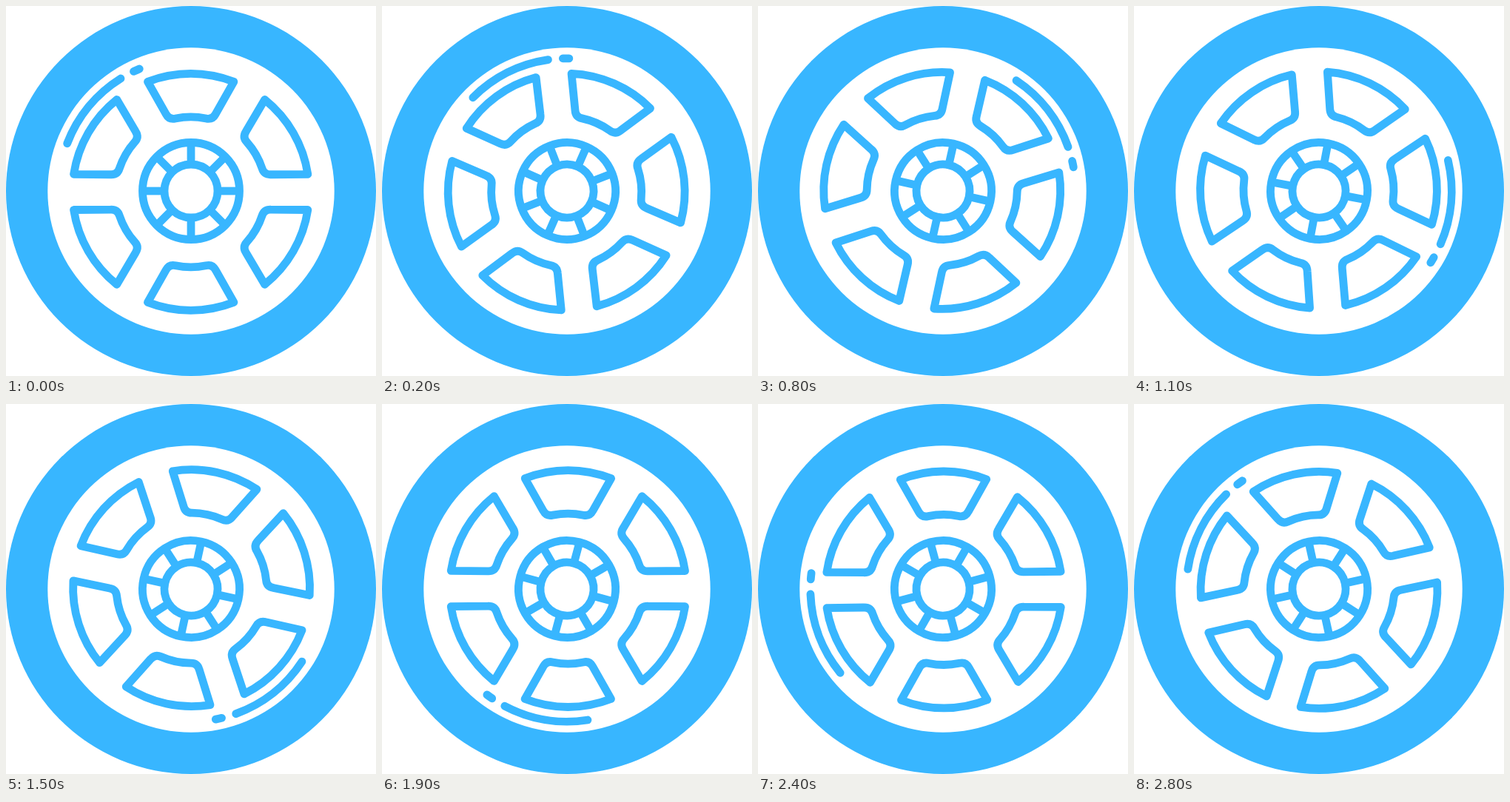
Recreate the animation shown at these times as an HTML page. Size 500 by 500 pixels, loop 2900 ms.

```html
<!DOCTYPE html>
<html lang="en">
<head>
<meta charset="utf-8">
<title>Turning wheel</title>
<style>
  html, body { margin: 0; width: 100%; height: 100%; overflow: hidden; background: #fff; }
  svg { display: block; width: 100vw; height: 100vh; }
</style>
</head>
<body>
<svg viewBox="-250 -250 500 500">
  <circle r="250" fill="#38b6ff"/>
  <circle r="193.7" fill="#fff"/>
  <g id="wheel" fill="none" stroke="#38b6ff" stroke-width="10.8" stroke-linecap="round" stroke-linejoin="round">
    <circle r="65.5"/>
    <circle r="36"/>
    <!-- the panels sit slightly off the axle -->
    <g id="panels" transform="translate(-0.3 1.4)"/>
  </g>
</svg>
<script>
const STEP = 100, STEPS = 29;
// [step, degrees]
const KEYS = [[0, 0], [5, 59.5], [11, 145.6], [15, 192.2], [28, 347.6]];
const wheel = document.getElementById('wheel');
const panels = document.getElementById('panels');

function addPath(parent, d, turn = 0, cap = 'round') {
  const path = document.createElementNS('http://www.w3.org/2000/svg', 'path');
  path.setAttribute('d', d);
  path.setAttribute('transform', `rotate(${turn})`);
  path.setAttribute('stroke-linecap', cap);
  parent.append(path);
}

// Point at an angle measured clockwise from the top
function polar(r, deg) {
  const a = deg * Math.PI / 180;
  return `${(r * Math.sin(a)).toFixed(2)} ${(-r * Math.cos(a)).toFixed(2)}`;
}

const arc = (r, from, to) => `M${polar(r, from)}A${r} ${r} 0 0 1 ${polar(r, to)}`;

const panel = 'M-58.2 -149A160 160 0 0 1 58.2 -149L33.6 -105.5' +
  'Q29.3 -97.4 20.6 -99.4A101.5 101.5 0 0 0 -20.6 -99.4Q-29.3 -97.4 -33.6 -105.5Z';

for (let i = 0; i < 8; i++) addPath(wheel, 'M0 -36V-65', i * 45, 'butt');
for (let i = 0; i < 6; i++) addPath(panels, panel, i * 60);
addPath(wheel, arc(179.2, -69, -32));
addPath(wheel, arc(179.2, -25.6, -22.9));

function angleAt(step) {
  let i = 1;
  while (step > KEYS[i][0]) i++;
  const [s0, a0] = KEYS[i - 1], [s1, a1] = KEYS[i];
  return a0 + (a1 - a0) * (step - s0) / (s1 - s0);
}

function draw(ms) {
  const step = Math.floor(ms / STEP) % STEPS;
  wheel.setAttribute('transform', `rotate(${angleAt(step).toFixed(2)})`);
}

const start = performance.now();
function tick() {
  draw(performance.now() - start);
  requestAnimationFrame(tick);
}
tick();
</script>
</body>
</html>
```
